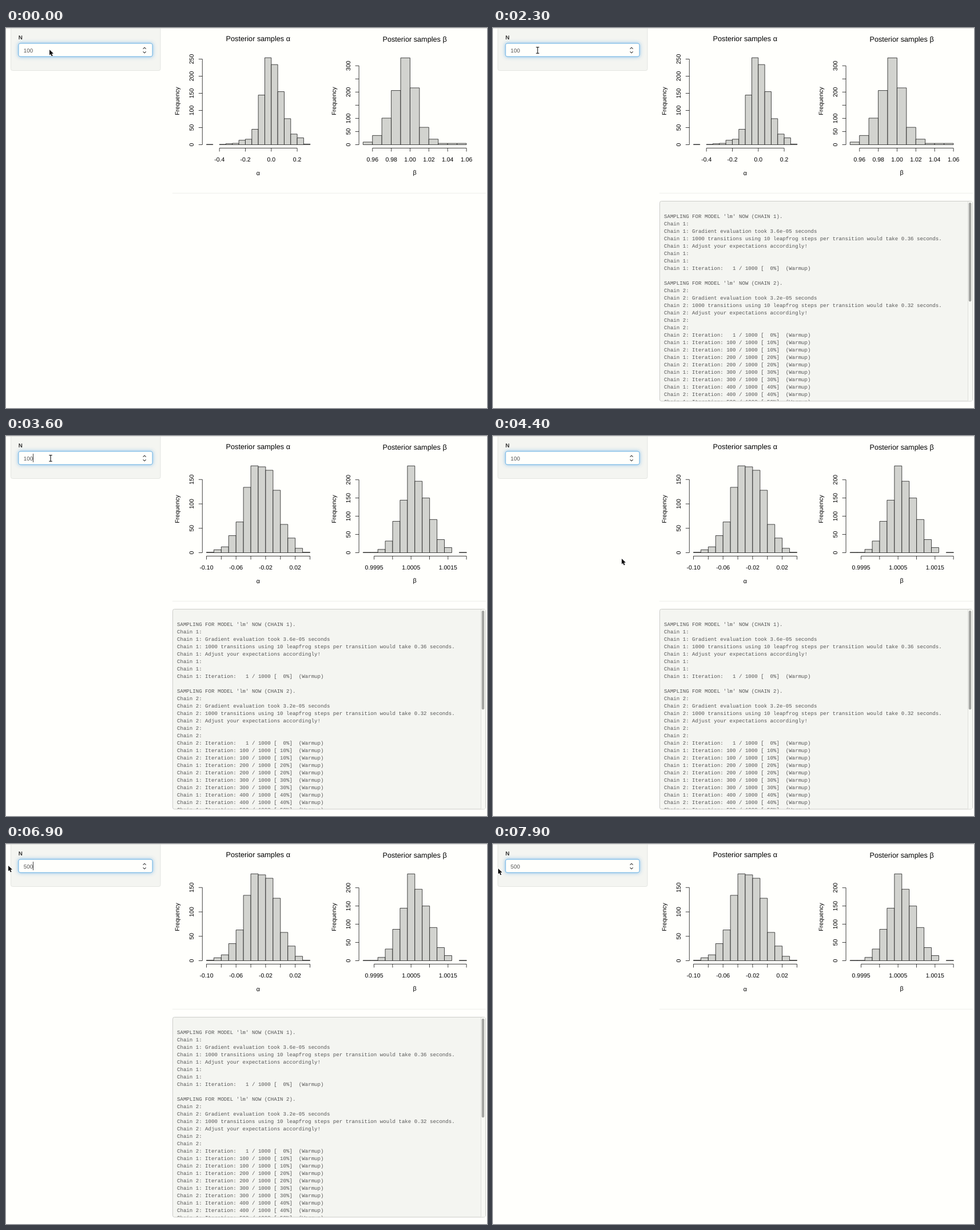
An HTML page with a canvas for the animation above (8 s loop, 841x666 px).

```html
<!DOCTYPE html>
<html lang="en">
<head>
<meta charset="utf-8">
<title>Posterior samples</title>
<style>
html, body { margin: 0; width: 100%; height: 100%; overflow: hidden; background: #fffffc; }
canvas { display: block; }
</style>
</head>
<body>
<canvas id="stage" width="841" height="666"></canvas>
<script>
const ctx = document.getElementById('stage').getContext('2d');
const LOOP = 8000;
const SANS = '"Liberation Sans", Arial, sans-serif';
const MONO = '"Liberation Mono", "Courier New", monospace';
const PAGE = '#fffffc', PANEL = '#f4f5f1', INK = '#000';
const BASE = 204.5;

const range = (n, f) => Array.from({ length: n }, (_, i) => f(i));

// Each plot: left edge, unit heights, axis ticks and bin counts.
const before = [
  { left: 350.5, bin: 11.33, unit: 0.6, step: 50, yLabels: ['0', '50', '100', '150', '200', '250'],
    x0: 373.2, dx: 45.3, xLabels: ['-0.4', '-0.2', '0.0', '0.2'],
    counts: [1, 0, 1, 3, 4, 13, 16, 45, 145, 254, 234, 155, 76, 31, 20, 2] },
  { left: 624.3, bin: 16.43, unit: 0.461, step: 50, yLabels: ['0', '50', '100', '', '200', '', '300'],
    x0: 640.8, dx: 32.86, xLabels: ['0.96', '0.98', '1.00', '1.02', '1.04', '1.06'],
    counts: [10, 35, 101, 206, 330, 216, 66, 21, 5, 5, 5] }
];
const after = [
  { left: 350.5, bin: 12.93, unit: 0.855, step: 50, yLabels: ['0', '50', '100', '150'],
    x0: 350.5, dx: 25.86, xLabels: ['-0.10', '', '-0.06', '', '-0.02', '', '0.02', ''],
    counts: [1, 6, 12, 35, 63, 134, 178, 176, 169, 128, 58, 30, 9, 1] },
  { left: 624.3, bin: 12.93, unit: 0.639, step: 50, yLabels: ['0', '50', '100', '150', '200'],
    x0: 643.6, dx: 32.3, xLabels: ['0.9995', '', '1.0005', '', '1.0015', ''],
    counts: [1, 1, 9, 32, 86, 144, 238, 196, 150, 91, 36, 14, 0, 1] }
];

const iteration = (chain, n) =>
  `Chain ${chain}: Iteration: ${String(n).padStart(3)} / 1000 [${String(Math.floor(n / 10)).padStart(3)}%]  (Warmup)`;

function chainIntro(c, cost) {
  const p = `Chain ${c}: `;
  return [
    `SAMPLING FOR MODEL 'lm' NOW (CHAIN ${c}).`,
    p,
    `${p}Gradient evaluation took ${cost}e-05 seconds`,
    `${p}1000 transitions using 10 leapfrog steps per transition would take 0.${cost * 10} seconds.`,
    `${p}Adjust your expectations accordingly!`,
    p, p,
    iteration(c, 1)
  ];
}
const log = [
  ...chainIntro(1, 3.6), '', ...chainIntro(2, 3.2),
  ...range(9, i => iteration(i % 2 + 1, 100 * (Math.floor(i / 2) + 1)))
];

// Pointer: time, x, y, shape
const pointer = [
  [0, 76, 38, 'arrow'], [100, 78, 39, 'beam'],
  [3700, 95, 62, 'arrow'], [3800, 150, 145, 'arrow'], [3900, 230, 280, 'arrow'],
  [4000, 315, 410, 'beam'], [4100, 357, 476, 'beam'],
  [4300, 318, 400, 'beam'], [4400, 225, 215, 'arrow'], [4500, 152, 87, 'arrow'],
  [5000, 140, 78, 'arrow'], [5100, 118, 60, 'arrow'], [5200, 95, 45, 'beam'], [5300, 84, 40, 'beam'],
  [5400, 70, 40, 'beam'], [5500, 54, 40, 'beam'], [5600, 37, 40, 'beam'], [5700, 23, 40, 'beam'],
  [5800, 17.5, 40, 'beam'], [6000, 6.5, 40, 'beam'],
  [6700, 4, 38, 'arrow'], [7900, 9, 43, 'arrow']
];
const typed = [[0, '100'], [6700, '5'], [6800, '50'], [6900, '500']];
const caretOn = [[0, 0], [500, 1], [1700, 0], [2900, 1], [4100, 0], [5300, 1], [5500, 0], [6700, 1], [7700, 0]];
const selected = [[0, 0], [5500, 0], [5600, 2], [5700, 3], [6700, 0]];

const at = (keys, t) => keys.filter(k => k[0] <= t).pop();

function text(s, x, y, size, { font = SANS, color = INK, align = 'left', weight = '', turn = 0 } = {}) {
  ctx.save();
  ctx.translate(x, y);
  ctx.rotate(turn);
  ctx.font = `${weight} ${size}px ${font}`;
  ctx.fillStyle = color;
  ctx.textAlign = align;
  ctx.fillText(s, 0, 0);
  ctx.restore();
}

function line(points, color = INK, width = 0.75) {
  ctx.beginPath();
  points.forEach(([x, y]) => ctx.lineTo(x, y));
  ctx.strokeStyle = color;
  ctx.lineWidth = width;
  ctx.stroke();
}

function box(x, y, w, h, r, fill, stroke) {
  ctx.beginPath();
  ctx.roundRect(x, y, w, h, r);
  ctx.fillStyle = fill;
  ctx.fill();
  if (!stroke) return;
  ctx.strokeStyle = stroke;
  ctx.lineWidth = 1;
  ctx.stroke();
}

function histogram(p, name, mid, titleY, nameY) {
  const axis = mid - 97.5;
  const up = { align: 'center', turn: -Math.PI / 2 };
  text(`Posterior samples ${name}`, mid, titleY, 12.7, { align: 'center' });
  text('Frequency', axis - 40.5, 128, 10.5, up);
  text(name, mid, nameY, 10.8, { align: 'center' });

  p.counts.forEach((n, i) => {
    if (!n) return;
    const h = n * p.unit;
    ctx.beginPath();
    ctx.rect(p.left + i * p.bin, BASE - h, p.bin, h);
    ctx.fillStyle = '#d2d3cf';
    ctx.fill();
    ctx.strokeStyle = '#111';
    ctx.lineWidth = 0.75;
    ctx.stroke();
  });

  const top = BASE - (p.yLabels.length - 1) * p.step * p.unit;
  line([[axis, BASE], [axis, top]]);
  p.yLabels.forEach((s, i) => {
    const y = BASE - i * p.step * p.unit;
    line([[axis - 6.5, y], [axis, y]]);
    text(s, axis - 15.5, y, 10.5, up);
  });

  line([[p.x0, 210.5], [p.x0 + (p.xLabels.length - 1) * p.dx, 210.5]]);
  p.xLabels.forEach((s, i) => {
    const x = p.x0 + i * p.dx;
    line([[x, 210.5], [x, 216.5]]);
    text(s, x, 233.7, 10.5, { align: 'center' });
  });
}

function sidebar(t) {
  box(8.5, -10, 261.5, 84.5, 3, PANEL, '#e4e5e1');
  text('N', 21.7, 20, 9.8, { weight: 'bold', color: '#333' });

  ctx.save();
  ctx.shadowColor = 'rgba(102,175,233,.7)';
  ctx.shadowBlur = 6;
  box(22, 27, 234, 23, 3, PAGE, '#7fbbe6');
  ctx.restore();
  box(22, 27, 234, 23, 3, PAGE, '#7fbbe6');
  line([[239.6, 36.6], [242.2, 34.2], [244.8, 36.6]], '#333', 1.1);
  line([[239.6, 41.4], [242.2, 43.8], [244.8, 41.4]], '#333', 1.1);

  const value = at(typed, t)[1], size = 9.8, x = 30.8, digit = size * 0.556;
  text(value, x, 43.3, size, { color: '#555' });
  const n = at(selected, t)[1];
  if (n) {
    const sx = x + (3 - n) * digit;
    ctx.fillStyle = '#3584e4';
    ctx.fillRect(sx, 31, n * digit, 15);
    text(value.slice(-n), sx, 43.3, size, { color: '#fff' });
  }
  if (at(caretOn, t)[1]) {
    ctx.fillStyle = '#444';
    ctx.fillRect(Math.floor(x + value.length * digit), 31, 1, 15);
  }
}

function logPanel() {
  box(291.5, 303.5, 547, 350.5, 3, PANEL, '#cccdc9');
  ctx.save();
  ctx.beginPath();
  ctx.rect(292, 304, 546, 349.5);
  ctx.clip();
  log.forEach((s, i) => text(s, 299, 333.3 + 13 * i, 9.1, { font: MONO, color: '#555' }));
  ctx.fillStyle = '#f8f9f5';
  ctx.fillRect(830, 304, 8, 350);
  line([[830.5, 304], [830.5, 654]], '#dedfdb', 1);
  box(831.8, 306, 4.4, 173.5, 2.2, '#a3a4a1');
  ctx.restore();
}

function drawArrow() {
  ctx.beginPath();
  [[0, 0], [0, 9.6], [2.2, 7.7], [3.9, 11.5], [5.7, 10.7], [4, 7], [7, 6.8]].forEach(([x, y]) => ctx.lineTo(x, y));
  ctx.closePath();
  ctx.strokeStyle = '#fff';
  ctx.lineWidth = 1.4;
  ctx.stroke();
  ctx.fillStyle = '#111';
  ctx.fill();
}

function drawBeam() {
  for (const [color, width] of [['#fff', 2.6], ['#111', 1.1]]) {
    line([[-2.7, -5.3], [2.7, -5.3]], color, width);
    line([[0, -5.3], [0, 5.3]], color, width);
    line([[-2.7, 5.3], [2.7, 5.3]], color, width);
  }
}

function draw(t) {
  ctx.fillStyle = PAGE;
  ctx.fillRect(0, 0, 841, 666);
  sidebar(t);
  ctx.fillStyle = '#dcddd9';
  ctx.fillRect(0, 0, 841, 1);

  const plots = t < 3600 ? before : after;
  histogram(plots[0], 'α', 440.8, 23, 258.3);
  histogram(plots[1], 'β', 714.6, 23.7, 256.6);
  line([[291, 289.5], [839, 289.5]], '#eeefeb', 1);
  if (t >= 2300 && t < 7300) logPanel();

  const [, x, y, shape] = at(pointer, t);
  ctx.save();
  ctx.translate(x, y);
  if (shape === 'arrow') drawArrow(); else drawBeam();
  ctx.restore();
}

ctx.textRendering = 'geometricPrecision';
const start = performance.now();
function frame() {
  draw((performance.now() - start) % LOOP);
  requestAnimationFrame(frame);
}
frame();
</script>
</body>
</html>
```
